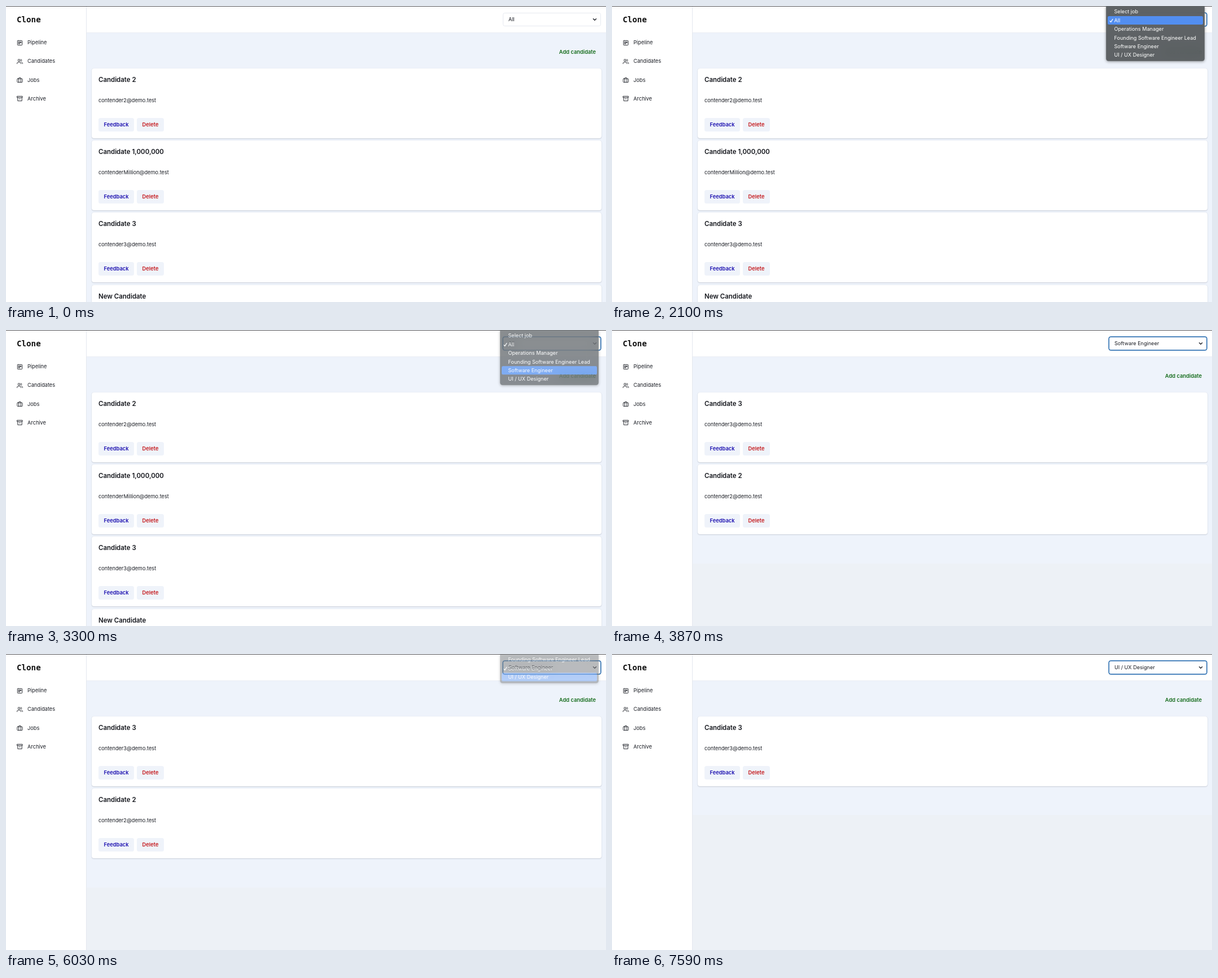
Recreate the animation shown at these times as an HTML page. Size 1064 px wide and 526 px high, loop 7.92 s.

```html
<!DOCTYPE html>
<html lang="en">
<head>
<meta charset="utf-8">
<title>Candidates</title>
<style>
  :root { --loop: 7920ms; --row: 15.4px; --ink: #1a1d24; --ring: #3575b5; }
  * { box-sizing: border-box; }
  html, body { margin: 0; width: 100%; height: 100%; overflow: hidden; }
  body {
    position: relative; background: #edf1f6; color: var(--ink);
    font: 9.2px/14px Inter, "Open Sans", sans-serif;
  }
  body *, .abs { position: absolute; white-space: nowrap; }
  svg { fill: none; stroke: currentColor; stroke-linecap: round; stroke-linejoin: round; }
  svg * { position: static; }

  /* Frame */
  .top-line { left: 0; top: 0; width: 100%; height: 1px; background: #55565a; }
  .sidebar { left: 0; top: 0; width: 143px; height: 100%; background: #fff; border-right: 1px solid #e4e8ee; }
  .brand { left: 19px; top: 15px; font: bold 14.2px/18px "DejaVu Sans Mono", monospace; color: #111; }
  .nav { left: 0; height: 14px; }
  .nav svg { left: 18.5px; top: 1.5px; width: 11px; height: 11px; stroke-width: 2; }
  .nav span { left: 38px; top: 0; }
  .header { left: 143px; top: 0; right: 0; height: 48px; background: #fff; border-bottom: 1px solid #e9edf3; }
  .add { right: 18px; top: 75px; font-weight: 600; font-size: 9.3px; color: #156c1c; }

  /* Candidate lists */
  .list { left: 143px; right: 0; top: 48px; background: #eef3fb; animation: var(--loop) step-end infinite; }
  .everyone { height: 478px; animation-name: everyone; }
  .matches { height: 367px; animation-name: matches, shrink; }
  .matches .card + .card { animation: second var(--loop) step-end infinite; }
  .card {
    left: 9px; width: 904px; height: 124px; background: #fff; border-radius: 4px;
    box-shadow: 0 1px 2px rgba(20, 30, 50, .16), 0 0 1px rgba(20, 30, 50, .12);
  }
  .card h2 { margin: 0; left: 12px; top: 12px; font-size: 11.45px; line-height: 16px; font-weight: 600; color: #14161c; }
  .card p { margin: 0; left: 12px; top: 50px; }
  .card b {
    top: 88px; height: 24px; line-height: 24px; border-radius: 3.5px; background: #eff3fa;
    font-weight: 600; font-size: 9.3px; text-align: center;
  }
  .feedback { left: 12px; width: 63px; color: #1c10b0; }
  .delete { left: 80px; width: 48px; color: #c4181c; }

  /* Job select */
  .select {
    left: 881px; top: 12px; width: 174px; height: 24px; border: 1px solid #e6eaf0;
    border-radius: 3.5px; background: #fff; animation: focus var(--loop) linear infinite;
  }
  .select span { left: 9px; top: 4px; font-size: 9.1px; animation: var(--loop) step-end infinite; }
  .select svg { left: 158px; top: 7px; width: 8px; height: 8px; stroke-width: 1.3; }
  .job1 { animation-name: job1 !important; }
  .job2 { animation-name: job2 !important; }
  .job3 { animation-name: job3 !important; }

  /* Pop-up menus */
  .menu {
    left: 876px; top: 0; width: 175px; border-radius: 0 0 4.5px 4.5px; opacity: 0; color: #fff;
    background: rgba(80, 84, 86, .91); backdrop-filter: blur(9px);
    box-shadow: 0 1px 5px rgba(0, 0, 0, .38), inset 0 0 0 .5px rgba(255, 255, 255, .18);
    font-size: 9.1px; animation: var(--loop) linear infinite;
  }
  .menu span { left: 14.5px; line-height: var(--row); }
  .menu svg { left: 6px; top: 22px; width: 7px; height: 8px; stroke-width: 1.2; }
  .menu i {
    left: 3px; top: 17.8px; width: 169px; height: 15.4px; border-radius: 2.5px;
    background: #528ef0; animation: var(--loop) step-end infinite;
  }
  .first { height: 98px; animation-name: first-menu; }
  .first i { animation-name: first-pick; }
  .next { height: 52px; animation-name: next-menu; }
  .next i { animation-name: next-pick; }

  @keyframes focus {
    0%, 14% { border-color: #e6eaf0; box-shadow: 0 0 0 0 var(--ring); }
    16.55%, 100% { border-color: var(--ring); box-shadow: 0 0 0 .7px var(--ring); }
  }
  @keyframes first-menu {
    0%, 21.57% { opacity: 0; }
    21.58%, 40.9% { opacity: 1; }
    43.55%, 100% { opacity: 0; }
  }
  @keyframes first-pick {
    0% { transform: none; opacity: 1; }
    28.02% { transform: translateY(var(--row)); opacity: 1; }
    28.78% { transform: translateY(calc(2 * var(--row))); opacity: 1; }
    29.91% { transform: translateY(calc(3 * var(--row))); opacity: 1; }
    40.52% { transform: translateY(calc(3 * var(--row))); opacity: 0; }
    40.9%, 100% { transform: translateY(calc(3 * var(--row))); opacity: 1; }
  }
  @keyframes next-menu {
    0%, 60.58% { opacity: 0; }
    60.59%, 74.61% { opacity: 1; }
    77.26%, 100% { opacity: 0; }
  }
  @keyframes next-pick {
    0% { transform: none; opacity: 1; }
    67.03% { transform: translateY(var(--row)); opacity: 1; }
    74.23% { transform: translateY(var(--row)); opacity: 0; }
    74.61%, 100% { transform: translateY(var(--row)); opacity: 1; }
  }
  @keyframes job1 { 0% { opacity: 1; } 43.55%, 100% { opacity: 0; } }
  @keyframes job2 { 0% { opacity: 0; } 43.55% { opacity: 1; } 77.26%, 100% { opacity: 0; } }
  @keyframes job3 { 0% { opacity: 0; } 77.26%, 100% { opacity: 1; } }
  @keyframes everyone { 0% { visibility: visible; } 43.55%, 100% { visibility: hidden; } }
  @keyframes matches { 0% { visibility: hidden; } 43.55%, 100% { visibility: visible; } }
  @keyframes shrink { 0% { height: 367px; } 78.02%, 100% { height: 238px; } }
  @keyframes second { 0% { opacity: 1; } 78.02%, 100% { opacity: 0; } }
</style>
</head>
<body>
  <div class="list everyone"></div>
  <div class="list matches"></div>
  <div class="add">Add candidate</div>

  <div class="header"></div>
  <div class="sidebar">
    <div class="brand">Clone</div>
    <div class="nav" style="top:58px">
      <svg viewBox="0 0 24 24"><rect x="3" y="3" width="18" height="18" rx="2"/><path d="M8 8v8M8 8h3v8H8M15 8h2v4h-2z"/></svg>
      <span>Pipeline</span>
    </div>
    <div class="nav" style="top:91.2px">
      <svg viewBox="0 0 24 24"><circle cx="9" cy="7.5" r="4"/><path d="M1.5 21v-2a4 4 0 0 1 4-4h7a4 4 0 0 1 4 4v2M16 3.6a4 4 0 0 1 0 7.8M22.5 21v-2a4 4 0 0 0-3-3.9"/></svg>
      <span>Candidates</span>
    </div>
    <div class="nav" style="top:124.5px">
      <svg viewBox="0 0 24 24"><rect x="2" y="7" width="20" height="14" rx="2"/><path d="M8 21V5a2 2 0 0 1 2-2h4a2 2 0 0 1 2 2v16"/></svg>
      <span>Jobs</span>
    </div>
    <div class="nav" style="top:157.8px">
      <svg viewBox="0 0 24 24"><path d="M2 3h20v5H2zM4 8v13h16V8M10 13h4"/></svg>
      <span>Archive</span>
    </div>
  </div>

  <div class="select">
    <span class="job1">All</span>
    <span class="job2">Software Engineer</span>
    <span class="job3">UI / UX Designer</span>
    <svg viewBox="0 0 8 8"><path d="M1.4 2.7 4 5.3l2.6-2.6"/></svg>
  </div>
  <div class="top-line"></div>

  <div class="menu first"></div>
  <div class="menu next"></div>

<script>
  const find = name => document.querySelector(name);

  const card = ([name, mail], i) => `
    <div class="card" style="top:${62.8 + 128.3 * i}px">
      <h2>${name}</h2><p>${mail}@demo.test</p>
      <b class="feedback">Feedback</b><b class="delete">Delete</b>
    </div>`;

  const two = ["Candidate 2", "contender2"];
  const three = ["Candidate 3", "contender3"];
  const million = ["Candidate 1,000,000", "contenderMillion"];
  const fresh = ["New Candidate", "contender4"];

  find(".everyone").innerHTML = [two, million, three, fresh].map(card).join("");
  find(".matches").innerHTML = [three, two].map(card).join("");

  const menu = jobs => "<i></i>" +
    '<svg viewBox="0 0 7 8"><path d="M1 4.6 2.6 6.6 6 1.4"/></svg>' +
    jobs.map((job, i) => `<span style="top:${2.3 + 15.4 * i}px">${job}</span>`).join("");

  const jobs = ["Select job", "All", "Operations Manager",
    "Founding Software Engineer Lead", "Software Engineer", "UI / UX Designer"];
  find(".first").innerHTML = menu(jobs);
  find(".next").innerHTML = menu(jobs.slice(3));
</script>
</body>
</html>
```
